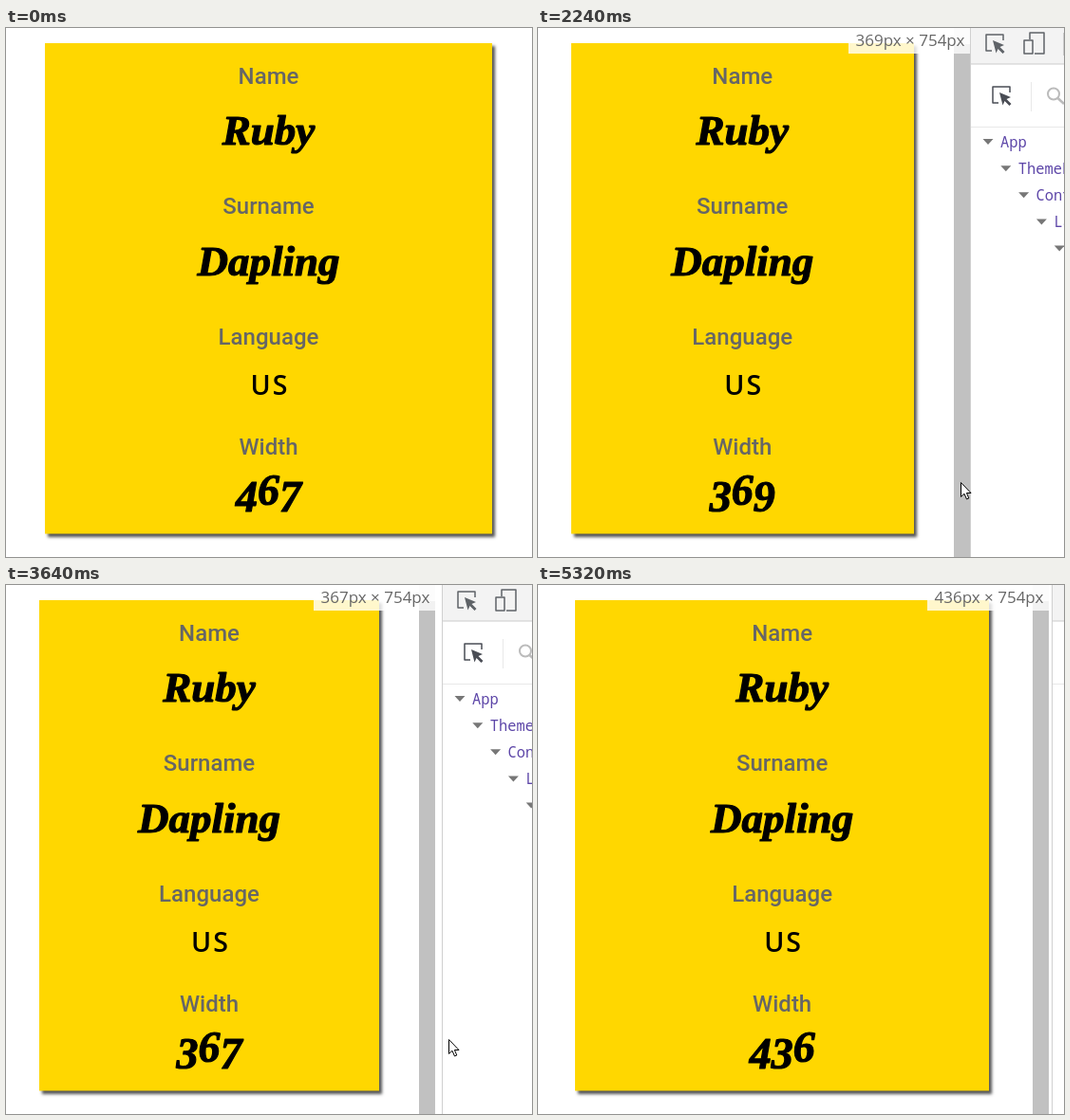
Animation of 554 by 558 pixels, one loop 5.4 s. Source, as an HTML page with a canvas:

```html
<!DOCTYPE html>
<html lang="en">
<head>
<meta charset="utf-8">
<title>Responsive card</title>
<style>
  html, body { margin: 0; width: 100%; height: 100%; overflow: hidden; background: #fff; }
  canvas { display: block; }
</style>
</head>
<body>
<canvas id="stage" width="554" height="558"></canvas>
<script>
const ctx = document.getElementById('stage').getContext('2d');
const LOOP = 5400, STEP = 40;

// [time in ms, value] keys, joined by a monotone cubic curve
const pageWidth = track([[1500, 467], [2000, 411], [2520, 327], [2760, 314], [3120, 314],
  [3640, 367], [3720, 377], [4280, 425], [4360, 431], [4600, 436]]);
const panelLead = track([[3120, 0], [3240, 5], [3640, 6.5], [4360, 5], [4760, 3]]);
const cursorX = track([[1520, 572], [2000, 499], [2520, 391], [2760, 375], [3120, 377],
  [3240, 388], [3640, 466], [4360, 536], [4600, 540]]);

const TREE = [
  [0, 0, 'App', true], [1, 1, 'ThemeProvider', true], [2, 2, 'Context.Provider', true],
  [3, 3, 'LanguageProvider', true], [4, 4, 'Context.Provider', true],
  [5, 5, 'Greeting', true], [6, 6, 'Card', true], [7, 7, 'Row', false], [8, 7, 'Row', false],
  [9, 7, 'Row', true], [12, 5, 'Greeting', true],
  [13, 6, 'Row', false], [14, 6, 'Row', false], [15, 6, 'Row', false]
];

function track(keys) {
  const secant = i => (keys[i + 1][1] - keys[i][1]) / (keys[i + 1][0] - keys[i][0]);
  const slopes = keys.map((_, i) => {
    if (i === 0 || i === keys.length - 1) return 0;
    const a = secant(i - 1), b = secant(i);
    return a * b > 0 ? 2 * a * b / (a + b) : 0;
  });
  return t => {
    if (t <= keys[0][0]) return keys[0][1];
    const i = keys.findIndex(key => key[0] >= t) - 1;
    if (i < 0) return keys[keys.length - 1][1];
    const [t0, v0] = keys[i], [t1, v1] = keys[i + 1];
    const span = t1 - t0, u = (t - t0) / span, w = 1 - u;
    return v0 * w * w * (1 + 2 * u) + v1 * u * u * (3 - 2 * u)
      + span * u * w * (slopes[i] * w - slopes[i + 1] * u);
  };
}

function rect(x, y, w, h, color) {
  ctx.fillStyle = color;
  ctx.fillRect(x, y, w, h);
}

function text(str, x, y, font, color, align = 'left') {
  ctx.font = font;
  ctx.fillStyle = color;
  ctx.textAlign = align;
  ctx.fillText(str, x, y);
}

function line(points, color, width = 1.5, close = false) {
  ctx.beginPath();
  points.forEach(([x, y]) => ctx.lineTo(x, y));
  if (close) ctx.closePath();
  ctx.strokeStyle = color;
  ctx.lineWidth = width;
  ctx.stroke();
}

function polygon(points, color) {
  ctx.beginPath();
  points.forEach(([x, y]) => ctx.lineTo(x, y));
  ctx.fillStyle = color;
  ctx.fill();
}

function at(x, y, draw) {
  ctx.save();
  ctx.translate(x, y);
  draw();
  ctx.restore();
}

const serif = size => `italic 700 ${size}px "Liberation Serif", serif`;

function heavy(str, x, y, size, align) {
  text(str, x, y, serif(size), '#000', align);
  ctx.strokeStyle = '#000';
  ctx.lineWidth = 1.2;
  ctx.lineJoin = 'round';
  ctx.strokeText(str, x, y);
}

// Old-style figures: 0-2 are small, 6 and 8 rise, the rest descend
function oldStyleNumber(value, center, baseline) {
  const figures = [...String(value)].map(digit => {
    const size = digit === '2' ? 37 : digit < '2' ? 32 : 46;
    ctx.font = serif(size);
    return { digit, size, drop: '34579'.includes(digit) ? 7 : 0, width: ctx.measureText(digit).width };
  });
  let x = center - figures.reduce((sum, f) => sum + f.width, 0) / 2;
  for (const f of figures) {
    heavy(f.digit, x, baseline + f.drop, f.size, 'left');
    x += f.width;
  }
}

function card(width, view) {
  const left = Math.round(0.05 * view + 13), right = Math.round(0.95 * view - 20);
  ctx.save();
  ctx.shadowColor = '#555';
  ctx.shadowOffsetX = ctx.shadowOffsetY = 3;
  ctx.shadowBlur = 3;
  rect(left, 16, right - left, 517.5, '#ffd700');
  ctx.restore();

  const center = view / 2 - 3.5;
  [['Name', 59], ['Surname', 196], ['Language', 333.5], ['Width', 450]].forEach(([label, y]) =>
    text(label, center, y, '500 24px Roboto, sans-serif', '#666', 'center'));
  heavy('Ruby', center, 123, 45, 'center');
  heavy('Dapling', center, 260.5, 45, 'center');
  ctx.letterSpacing = '2px';
  text('US', center + 1.5, 387, '600 28.5px "Open Sans", sans-serif', '#000', 'center');
  ctx.letterSpacing = '0px';
  oldStyleNumber(width, center, 502.5);
}

function inspectIcon(x, y, color) {
  at(x, y, () => {
    line([[7, 18], [1, 18], [1, 1], [19, 1], [19, 7]], color);
    polygon([[8, 7], [20, 12], [15.5, 14], [20.5, 19], [18.5, 21], [13.5, 16], [11.5, 20.5]], color);
  });
}

function devtools(x) {
  at(x, 0, () => {
    rect(0, 0, 554, 558, '#fff');
    rect(0, 0, 554, 38, '#f3f3f3');
    rect(0, 37.5, 554, 1, '#ccc');
    rect(0, 104, 554, 1, '#e8e8e8');
    rect(0, 0, 1, 558, '#d0d0d0');

    inspectIcon(16, 6, '#5f6368');
    line([[63, 12], [63, 5], [78, 5], [78, 27], [68, 27]], '#5f6368');
    line([[57, 13], [66, 13], [66, 27], [57, 27]], '#5f6368', 1.5, true);
    rect(98, 5, 1, 24, '#ccc');
    rect(129, 7, 21, 20, '#5b45b5');
    rect(108, 36, 90, 2.5, '#2a66dd');

    inspectIcon(23, 61, '#4a4d55');
    rect(64, 57, 1, 31, '#e8e8e8');
    ctx.beginPath();
    ctx.arc(88, 69.5, 6, 0, 2 * Math.PI);
    ctx.strokeStyle = '#bbb';
    ctx.lineWidth = 2;
    ctx.stroke();
    line([[92.5, 74], [99, 80]], '#bbb', 2.5);
    text('Search (text or /regex/)', 115, 79, '20px "Liberation Sans", sans-serif', '#777');

    for (const [row, depth, name, open] of TREE) {
      const tx = 32 + depth * 18.8, ty = 120 + row * 28.15;
      if (open) polygon([[tx - 18.5, ty - 3], [tx - 7.5, ty - 3], [tx - 13, ty + 3]], '#777');
      text(name, tx, ty + 5.5, '15.4px "Noto Sans Mono", monospace', '#5d46a8');
    }
  });
}

function sizeLabel(width, edge) {
  rect(edge - 128, 0, 128, 27, 'rgba(255,255,255,.8)');
  text(`${width}px × 754px`, edge - 120.5, 18.5, '17px "Open Sans", sans-serif', '#666');
}

function cursor(x) {
  at(x, 479, () => {
    const arrow = [[.5, .5], [.5, 15.5], [4, 12.3], [6.5, 18], [8.8, 17], [6.4, 11.5], [11, 11.5]];
    polygon(arrow, '#fff');
    line(arrow, '#000', 1, true);
  });
}

function draw(t) {
  const width = Math.round(pageWidth(t));
  const view = 1.25 * (width - 19);
  const bar = Math.round(view), edge = bar + 17;

  rect(0, 0, 554, 558, '#fff');
  card(width, view);
  rect(bar, 0, 17, 558, '#f1f1f1');
  rect(bar, 17, 17, 541, '#c1c1c1');
  if (t >= 1560) sizeLabel(width, edge);
  devtools(Math.round(edge + panelLead(t)));
  if (t >= 1560 && t < 5240) cursor(Math.round(cursorX(t)));
}

function frame() {
  draw(Math.floor(performance.now() % LOOP / STEP) * STEP);
  requestAnimationFrame(frame);
}
frame();
</script>
</body>
</html>
```
